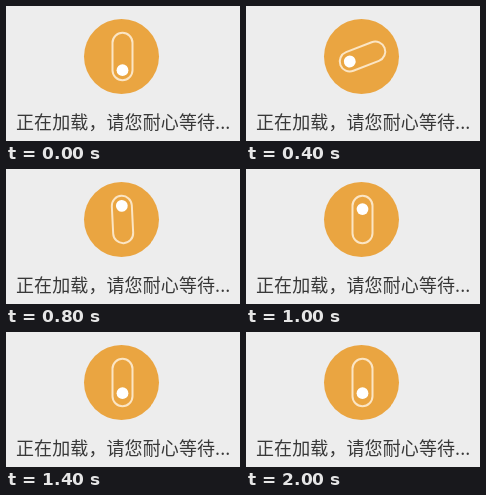
Recreate the animation shown at these times as an HTML page. Size 234 px wide and 135 px high, loop 2100 ms.

```html
<!DOCTYPE html>
<html lang="zh-CN">
<head>
<meta charset="utf-8">
<title>加载中</title>
<style>
  html, body { margin: 0; width: 100%; height: 100%; overflow: hidden; background: #ededed; }
  svg { display: block; }
  text { font: 300 18px "Noto Sans CJK SC", "Noto Sans CJK", sans-serif; letter-spacing: 0.1px; fill: #383838; }
</style>
</head>
<body>
<svg width="234" height="135" viewBox="0 0 234 135">
  <circle cx="115.5" cy="50.5" r="37.5" fill="#eaa541"/>
  <g id="pill">
    <rect x="-10" y="-23.7" width="20" height="47.4" rx="10" fill="none" stroke="#fbe5c4" stroke-width="2"/>
    <circle id="ball" r="5.9" fill="#fff"/>
  </g>
  <text x="10" y="122.5">正在加载，请您耐心等待...</text>
</svg>
<script>
  const LOOP = 2100, STEP = 100, TURN = 900, LAND = 1400;
  const REST = 13.7, HOP = 3;
  const pill = document.getElementById('pill');
  const ball = document.getElementById('ball');

  const easeIn = (p, power) => p ** power;
  const easeInOut = (p, power) => p < 0.5
    ? easeIn(2 * p, power) / 2
    : 1 - easeIn(2 - 2 * p, power) / 2;

  // Ball height relative to the pill's centre once the half turn is done.
  function dropY(t) {
    if (t < LAND) {
      const fall = easeIn((t - TURN) / (LAND - TURN), 1.25);
      return -REST + (2 * REST - HOP) * fall;
    }
    return (t - LAND) / STEP % 2 ? REST : REST - HOP;
  }

  function draw(now) {
    const t = Math.floor(now % LOOP / STEP) * STEP;
    const turning = t < TURN;
    const angle = turning ? 180 * easeInOut(t / TURN, 2.3) : 0;
    pill.setAttribute('transform', `translate(116.5 50.5) rotate(${angle})`);
    ball.setAttribute('cy', turning ? REST : dropY(t));
    requestAnimationFrame(() => draw(performance.now() - start));
  }

  const start = performance.now();
  draw(0);
</script>
</body>
</html>
```
